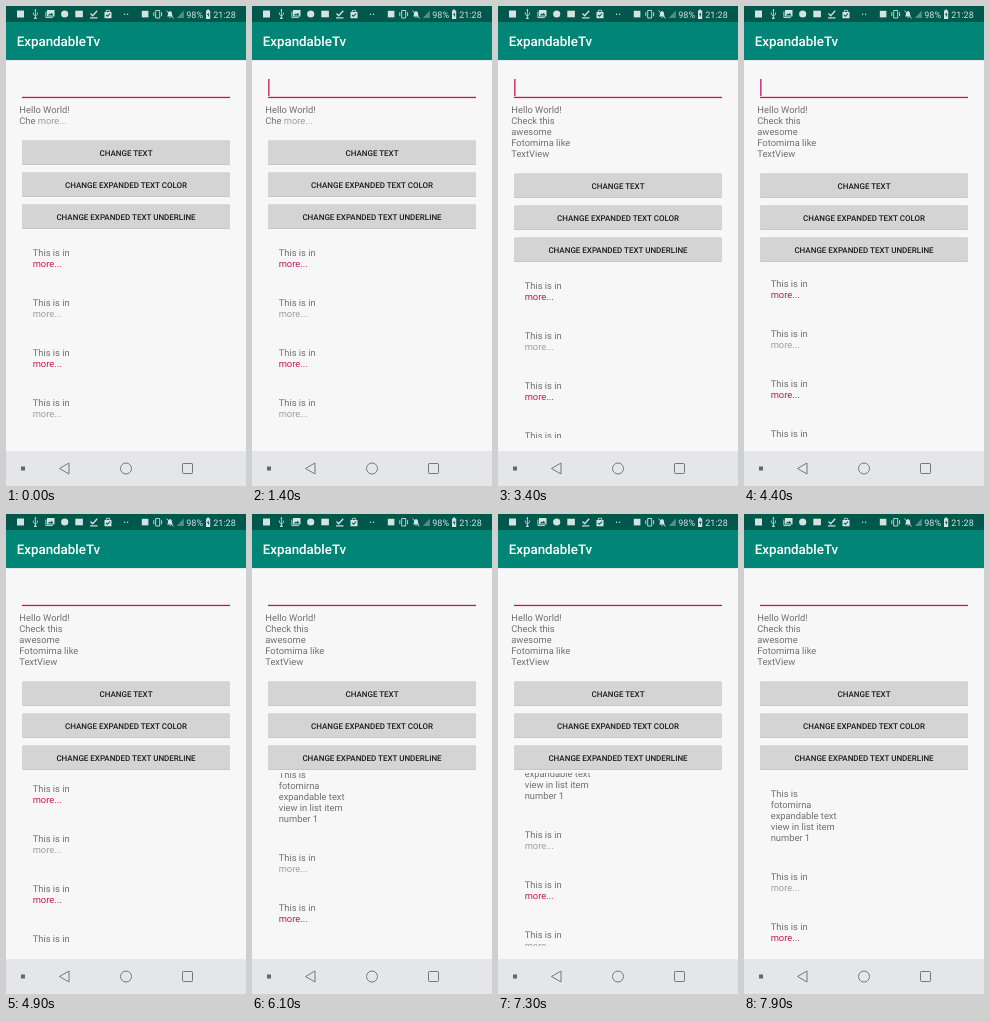
Animation, 240 px wide and 480 px high, one loop 8 s. Source, as an HTML page:

```html
<!DOCTYPE html>
<html lang="en">
<head>
<meta charset="utf-8">
<title>ExpandableTv</title>
<style>
  html, body { margin: 0; width: 100%; height: 100%; overflow: hidden; background: #f7f7f7; }
  svg { display: block; }
  text { font: 9.33px Roboto, sans-serif; fill: #707070; white-space: pre; text-rendering: geometricPrecision; }
  .title { font-size: 13.33px; font-weight: 500; fill: #fff; }
  .status { font-size: 9px; fill: #d3e3e0; }
  .label { font-size: 8px; font-weight: 500; fill: #1a1a1a; text-anchor: middle; }
  .grey { fill: #9e9e9e; }
  .pink { fill: #c5175a; }
  .button { fill: #d4d4d4; filter: drop-shadow(0 .8px .7px #0007); }
  .icons { fill: #d3e3e0; }
  .line { fill: none; stroke: #d3e3e0; }
  .nav { fill: none; stroke: #777; stroke-linejoin: round; }
</style>
</head>
<body>
<svg width="240" height="480" viewBox="0 0 240 480">
  <defs><clipPath id="clip"><rect id="port" width="240"/></clipPath></defs>
  <rect width="240" height="480" fill="#f7f7f7"/>

  <rect y="16" width="240" height="38" fill="#008577"/>
  <rect y="54" width="240" height="1" opacity=".06"/>
  <rect width="240" height="16" fill="#00574b"/>
  <text class="title" x="10.7" y="39.7">ExpandableTv</text>

  <g class="icons">
    <rect x="11" y="4.5" width="7" height="7"/>
    <path d="M28.4 4.5l1-1.7 1 1.7zM28.2 11.5h2.4v1.6h-2.4z"/>
    <path d="M41 4h7.5v6.5H41zm1 5.5h5.5l-1.8-2.8-1.5 1.7-.9-.9z" fill-rule="evenodd"/>
    <circle cx="58.7" cy="8" r="3.6"/>
    <rect x="69.3" y="4.7" width="7.6" height="6.6"/>
    <path d="M84 11.3h7.5v1.2H84z"/>
    <path d="M98.5 6h7v6.3h-7zm1.2 3.2l1.7 1.7 2.9-3-.7-.7-2.2 2.2-1-1z" fill-rule="evenodd"/>
    <circle cx="118.6" cy="8.3" r=".7"/><circle cx="121.6" cy="8.3" r=".7"/>
    <rect x="135.8" y="4.8" width="6.6" height="6.6"/>
    <path d="M161 10.6c1-1 .8-2 1-3.3.3-1.4 1-2 2-2s1.8.6 2 2c.2 1.3 0 2.3 1 3.3zM163 11.2h2l-1 1z"/>
    <path d="M170.8 12l7-7.5V12z" opacity=".4"/>
    <path d="M200 4.5h1.2v-1h1.8v1h1.2v8.4H200zm2.5 1.5l-1.5 3h1v2.3l1.5-3h-1z" fill-rule="evenodd"/>
  </g>
  <g class="line">
    <path d="M29.4 4v8M27.4 6.5v2l2 1.5 2-1.5v-2" stroke-width=".8"/>
    <path d="M39.9 5.5v6.1h7" stroke-width=".9"/>
    <path d="M84.5 7.5l2.2 2.2 4.5-5" stroke-width="1.3"/>
    <path d="M100.3 6V4.3h3.4V6" stroke-width=".8"/>
    <path d="M149.7 4.5h4V12h-4zM147.8 6.2v4M155.6 6.2v4" stroke-width=".9"/>
    <path d="M160.5 4.5l7 8" stroke-width=".9"/>
  </g>
  <text class="status" x="180.3" y="11.5">98%</text>
  <text class="status" x="207.3" y="11.5">21:28</text>

  <rect class="pink" x="16" y="90.8" width="208" height="1.3"/>
  <rect class="pink" id="cursor" x="16.2" y="73" width="1.3" height="17"/>

  <g id="intro"></g>
  <g id="list" clip-path="url(#clip)"></g>
  <g id="buttons"></g>

  <rect y="445" width="240" height="35" fill="#e5e6ea"/>
  <rect x="15" y="460.5" width="4" height="4" fill="#666"/>
  <path class="nav" d="M53.5 462.5l9.5-5.5v11z"/>
  <circle class="nav" cx="120" cy="462.5" r="5.5"/>
  <rect class="nav" x="176.5" y="457.5" width="10" height="10" rx=".8"/>
</svg>
<script>
const LOOP = 8000, LINE = 11, PITCH = 50, GROW = 33;
const $ = id => document.getElementById(id);

const lines = (rows, x, y) => rows.map((row, i) =>
  `<text x="${x}" y="${y + i * LINE}">${row}</text>`).join('');
const more = color => `<tspan class="${color}">more...</tspan>`;

const intro = {
  short: lines(['Hello World!', 'Che ' + more('grey')], 13.3, 107),
  full: lines(['Hello World!', 'Check this', 'awesome', 'Fotomirna like', 'TextView'], 13.3, 107)
};
const firstItem = ['This is', 'fotomirna', 'expandable text', 'view in list item', 'number 1'];

$('buttons').innerHTML = ['TEXT', 'EXPANDED TEXT COLOR', 'EXPANDED TEXT UNDERLINE'].map((name, i) =>
  `<rect class="button" x="16" y="${134.7 + i * 32}" width="208" height="24" rx="1.3"/>
   <text class="label" x="120" y="${149.5 + i * 32}">CHANGE ${name}</text>`).join('');

// [end time, scroll offset, easing power]
const scrollKeys = [[4200, 0, 1], [4900, 5.5, 1.5], [6000, 5.5, 1], [6500, 72.5, 1],
  [6900, 88, 2], [7300, 42, 1], [7800, 0, 1.6], [LOOP, 0, 1]];

function scrollAt(t) {
  let start = 0, from = 0;
  for (const [end, to, power] of scrollKeys) {
    if (t < end) return to + (from - to) * (1 - (t - start) / (end - start)) ** power;
    start = end;
    from = to;
  }
  return 0;
}

function list(y, open) {
  let out = '';
  for (let i = 0; i < 6; i++) {
    const rows = open && !i ? firstItem : ['This is in', more(i % 2 ? 'grey' : 'pink')];
    out += lines(rows, 26.7, y);
    y += PITCH + (open && !i ? GROW : 0);
  }
  return out;
}

let last = -1;
function draw(now) {
  const t = Math.floor(now % LOOP / 100) * 100;
  if (t !== last) {
    last = t;
    const shift = t >= 2800 ? GROW : 0;
    $('cursor').style.display = (t + 600) % 1000 < 500 ? '' : 'none';
    $('intro').innerHTML = shift ? intro.full : intro.short;
    $('buttons').setAttribute('transform', `translate(0 ${shift})`);
    $('port').setAttribute('y', 226 + shift);
    $('port').setAttribute('height', 206 - shift);
    $('list').innerHTML = list(250.2 + shift - scrollAt(t), t >= 5200);
  }
  requestAnimationFrame(draw);
}
draw(0);
</script>
</body>
</html>
```
